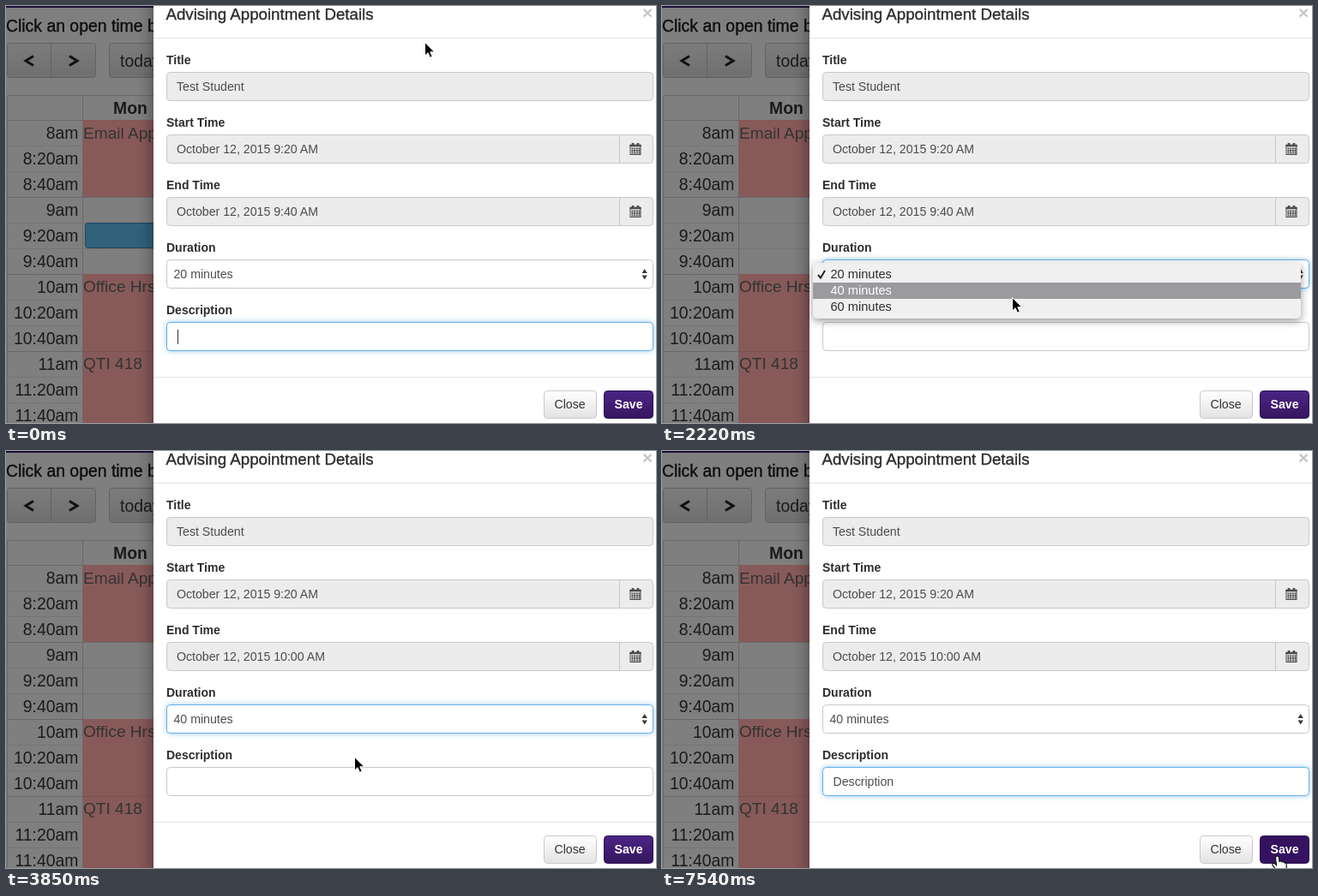
An HTML page for the animation above (7990 ms loop, 758 by 487 pixels).

```html
<!DOCTYPE html>
<html lang="en">
<head>
<meta charset="utf-8">
<title>Appointment form</title>
<style>
  html, body { margin: 0; width: 100%; height: 100%; overflow: hidden; background: #7f7f7f; }
  svg { display: block; font: 14.15px "Liberation Sans", Arial, sans-serif; }
  text { fill: #4c4c4c; white-space: pre; }
  .medium { font-size: 18.7px; fill: #2c2c2c; stroke: #2c2c2c; stroke-width: .35px; }
  .label { font-size: 14px; font-weight: bold; fill: #2d2d2d; }
  .page text { font-size: 19.4px; fill: #1b1b1b; }
  .page .event { font-size: 19.1px; fill: #333; }
  .page .dark { fill: #0d0d0d; stroke: #0d0d0d; stroke-width: .35px; }
  .grid { stroke: #696969; fill: none; }
  .pink { fill: #875a59; }
  .field { fill: #fff; stroke: #c8c8c8; }
  .readonly { fill: #ececec; }
  .blurring { stroke: #85bbe6; }
  .focus { stroke: #66afe9; filter: drop-shadow(0 0 3px rgba(102, 175, 233, .65)); }
  #menu text { font-size: 14.6px; fill: #2e2e2e; }
  #menu text.on { fill: #fff; }
  .pointer { stroke: #fff; stroke-linejoin: round; }
</style>
</head>
<body>
<svg width="758" height="487">
  <defs>
    <linearGradient id="gray" x2="0" y2="1"><stop stop-color="#7c7c7c"/><stop offset="1" stop-color="#6f6f6f"/></linearGradient>
    <linearGradient id="light" x2="0" y2="1"><stop stop-color="#fff"/><stop offset="1" stop-color="#e3e3e3"/></linearGradient>
    <linearGradient id="purple" x2="0" y2="1"><stop stop-color="#4b2585"/><stop offset="1" stop-color="#36165f"/></linearGradient>
    <g id="calendar" stroke="#4a4a4a" fill="none">
      <path d="M0 3H13M3.5 0V3M9.5 0V3" stroke-width="2.6"/>
      <rect x=".5" y="2.5" width="12" height="11"/>
      <path d="M2 6.5H12M2 9H12M2 11.5H12" stroke-width="1.8" stroke-dasharray="1.9 .8"/>
    </g>
  </defs>

  <g class="page">
    <rect width="758" height="487" fill="#7f7f7f"/>
    <rect width="758" height="2" fill="#1d0f35"/>
    <text class="dark" x="0" y="30">Click an open time block</text>
    <g fill="url(#gray)" stroke="#626262">
      <rect x="1.5" y="43.5" width="103" height="40" rx="3"/>
      <rect x="120.5" y="43.5" width="80" height="40" rx="3"/>
      <path d="M52.5 44V83"/>
    </g>
    <path d="M32 58.5L23 64L32 69.5M74 58.5L83 64L74 69.5" fill="none" stroke="#111" stroke-width="3"/>
    <text x="133" y="71">today</text>
    <path class="grid" d="M1.5 487V104.5H180M89.5 104V487M1 133.5H180"/>
    <g id="rows"></g>
    <path class="pink" d="M90 133H180V223H90ZM90 313H180V487H90Z"/>
    <path d="M90 403.5H180" stroke="#7c5352"/>
    <text x="125" y="126" font-weight="bold">Mon</text>
    <text class="event" x="90" y="155">Email Appts</text>
    <text class="event" x="90" y="334">Office Hrs</text>
    <text class="event" x="90" y="424">QTI 418</text>
    <rect id="slot" x="92.5" y="253.5" width="100" height="29" rx="3" fill="#30627c" stroke="#1f465b"/>
  </g>

  <rect x="172" y="-40" width="640" height="580" fill="#fff" style="filter:drop-shadow(0 5px 10px rgba(0,0,0,.45))"/>
  <path d="M172 37.5H758M172 433.5H758" stroke="#e3e3e3"/>
  <text class="medium" x="186.5" y="16">Advising Appointment Details</text>
  <text x="742" y="14.5" style="font-size:21px;font-weight:bold;fill:#c4c4c4">×</text>

  <text class="label" x="187" y="68">Title</text>
  <text class="label" x="187" y="141">Start Time</text>
  <text class="label" x="187" y="214">End Time</text>
  <text class="label" x="187" y="287">Duration</text>
  <text class="label" x="187" y="360">Description</text>
  <rect class="field readonly" x="187.5" y="77.5" width="567" height="33" rx="4"/>
  <rect class="field readonly" x="187.5" y="150.5" width="567" height="33" rx="4"/>
  <rect class="field readonly" x="187.5" y="223.5" width="567" height="33" rx="4"/>
  <rect id="duration" x="187.5" y="296.5" width="567" height="33" rx="4"/>
  <rect id="description" x="187.5" y="369.5" width="567" height="33" rx="4"/>
  <path d="M715.5 151V183M715.5 224V256" stroke="#c8c8c8"/>
  <use href="#calendar" x="727.5" y="160"/>
  <use href="#calendar" x="727.5" y="233"/>
  <path d="M741.5 312h6.4l-3.2-5zM741.5 314.5h6.4l-3.2 5z" fill="#3a3a3a"/>
  <text x="199" y="99">Test Student</text>
  <text x="199" y="172">October 12, 2015 9:20 AM</text>
  <text id="end" x="199" y="245"></text>
  <text id="minutes" x="195.5" y="318"></text>
  <text id="typed" x="199.5" y="391"></text>
  <path id="caret" d="M0 378V395" stroke="#333"/>

  <rect x="627.5" y="449.5" width="61" height="32" rx="4" fill="url(#light)" stroke="#c9c9c9"/>
  <text x="639.5" y="470" style="fill:#333">Close</text>
  <rect id="save" x="697.5" y="449.5" width="57" height="32" rx="4" stroke="#2c1150"/>
  <text x="709.5" y="470" style="fill:#fff;font-weight:bold">Save</text>

  <g id="menu">
    <path d="M176 300H745V360a5 5 0 0 1-5 5H181a5 5 0 0 1-5-5Z" fill="#f0f0f0" style="filter:drop-shadow(0 3px 5px rgba(0,0,0,.4))"/>
    <rect id="bar" x="176" width="569" height="19" fill="#9b9a9f"/>
    <path id="check" d="M182 314l3 3.5 5-8.5" fill="none" stroke-width="2"/>
    <text x="196.5" y="318">20 minutes</text>
    <text x="196.5" y="337">40 minutes</text>
    <text x="196.5" y="356">60 minutes</text>
  </g>

  <g id="cursor">
    <path id="arrow" class="pointer" d="M0 0V15.5L3.6 12.2L6 17.8L8.7 16.6L6.3 11.2H11.2Z"/>
    <path id="beam" d="M-3.5 -7.5Q0 -7.5 0 -5Q0 -7.5 3.5 -7.5M0 -5.5V5.5M-3.5 7.5Q0 7.5 0 5Q0 7.5 3.5 7.5M-2 2H2" fill="none" stroke="#111" stroke-width="1.3"/>
    <path id="hand" d="M-2 1Q-2 -1.500 0 -1.500Q1.800 -1.500 2 1L2.500 5Q4.500 3.500 5.500 5.500Q7.500 4.500 8.300 6.500Q10.500 6 10.700 8.500V12Q9.500 14 9 17H0Q-2 13 -5 10Q-6.500 8 -5 7Q-3.500 6.500 -1 9Z" fill="#fff" stroke="#111" stroke-width="1.200"/>
  </g>
</svg>
<script>
const LOOP = 7990, TICK = 147.6;   // the screen refreshes once per tick
const $ = id => document.getElementById(id);
const show = (id, on) => $(id).setAttribute('visibility', on ? 'visible' : 'hidden');
const between = (n, a, b) => n >= a && n < b;

$('rows').innerHTML = Array.from({ length: 12 }, (_, i) => {
  const y = 133 + 30 * i, time = 8 + Math.floor(i / 3) + ['', ':20', ':40'][i % 3] + 'am';
  const dash = i % 3 ? 'stroke-dasharray="1 1"' : '';
  return `<path class="grid" d="M1 ${y + .5}H180" ${dash}/><text x="84.500" y="${y + 22}" text-anchor="end">${time}</text>`;
}).join('');

// tick, x, y
const path = [
  [1, 488, 42], [9, 412, 316], [10, 413, 318], [12, 413, 318], [15, 408, 340], [16, 409, 343],
  [18, 409, 343], [20, 411, 338], [24, 411, 338], [28, 401, 376], [43, 401, 376],
  [44, 402, 386], [46, 402, 386], [51, 717, 474]
];

function pointerAt(n) {
  const i = path.findIndex(p => p[0] > n);
  if (i === 0) return path[0].slice(1);
  if (i < 0) return path[path.length - 1].slice(1);
  const [a, x, y] = path[i - 1], [b, x2, y2] = path[i];
  const u = (n - a) / (b - a), e = u * u * (3 - 2 * u);
  return [x + (x2 - x) * e, y + (y2 - y) * e];
}

function draw() {
  const n = Math.floor(performance.now() % LOOP / TICK);
  const [x, y] = pointerAt(n);
  const open = between(n, 12, 25), chosen = n >= 25;

  show('slot', n < 12);
  $('end').textContent = `October 12, 2015 ${chosen ? '10:00' : '9:40'} AM`;
  $('minutes').textContent = chosen ? '40 minutes' : '20 minutes';
  const onSelect = between(n, 12, 28), fading = n === 12 ? ' blurring' : '';
  $('duration').setAttribute('class', 'field' + (fading || (onSelect ? ' focus' : '')));
  $('description').setAttribute('class', 'field' + (fading || (onSelect ? '' : ' focus')));

  $('menu').style.display = open ? '' : 'none';
  const row = n === 23 ? -1 : n < 14 ? 0 : 1;
  $('bar').setAttribute('y', 304 + 19 * row);
  show('bar', open && row >= 0);
  $('check').setAttribute('stroke', row === 0 ? '#fff' : '#222');
  document.querySelectorAll('#menu text').forEach((t, i) => t.classList.toggle('on', i === row));

  const letters = n < 39 ? Math.max(0, n - 31) : n - 30;
  $('typed').textContent = 'Description'.slice(0, letters);
  const caretX = 200.5 + (letters ? $('typed').getComputedTextLength() : 0);
  $('caret').setAttribute('transform', `translate(${Math.round(caretX) - .5})`);
  show('caret', n < 4 || between(n, 7, 12) || between(n, 28, 31) || between(n, 32, 44) || between(n, 47, 51));

  const onSave = x > 697 && y > 449;
  const inField = !open && x > 187 && between(y, 369, 403);
  $('save').setAttribute('fill', onSave ? '#34125f' : 'url(#purple)');
  $('cursor').setAttribute('transform', `translate(${Math.round(x) + .5} ${Math.round(y) + .5})`);
  show('hand', onSave);
  show('beam', inField);
  show('arrow', !onSave && !inField);
  requestAnimationFrame(draw);
}
draw();
</script>
</body>
</html>
```
